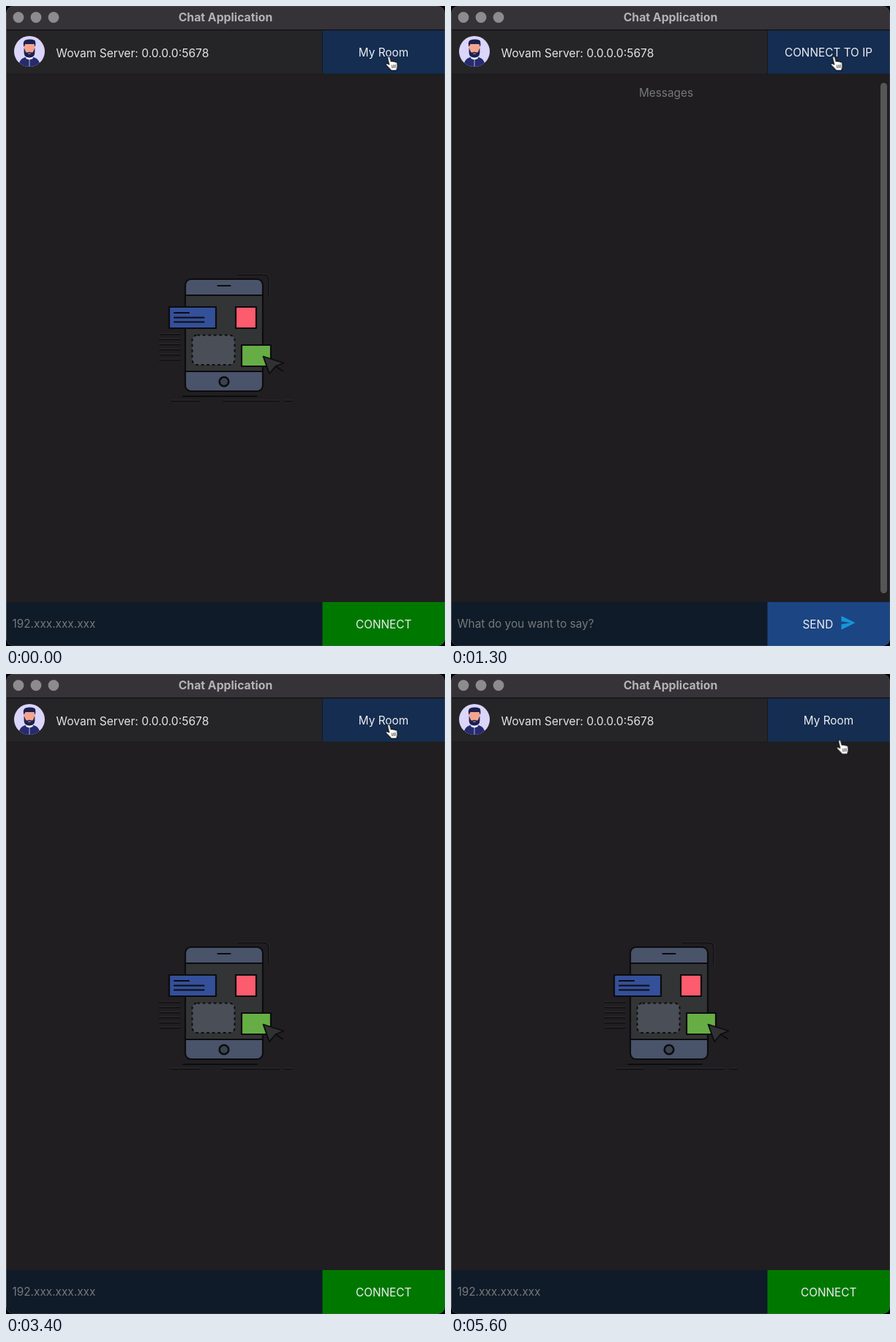
Recreate the animation shown at these times as an HTML page. Size 600 px wide and 874 px high, loop 5.7 s.

```html
<!DOCTYPE html>
<html lang="en">
<head>
<meta charset="utf-8">
<title>Chat Application</title>
<style>
  html, body { margin: 0; width: 100%; height: 100%; overflow: hidden; background: #000; }
  svg { display: block; width: 600px; height: 874px; }
  text { font: 15.35px Inter, "Open Sans", sans-serif; fill: #ededf0; }
  .title { font-weight: 700; font-size: 15.8px; fill: #b4b2b5; }
  .host { font-size: 15.6px; fill: #e4e4e6; }
  .mid { text-anchor: middle; }
  .hint { fill: #77787b; }
  .ink { fill: none; stroke: #0c0c0e; stroke-width: 2.2; stroke-linecap: round; stroke-linejoin: round; }
  .thin { stroke-width: 1.3; }

  .room, .chat, .hover, .address, .hand { animation: 5.7s step-end infinite; }
  .room { animation-name: room; }
  .chat { animation-name: chat; }
  .hover { animation-name: hover; }
  .address { animation-name: address; }
  .hand { animation-name: hand; }

  @keyframes room {
    0% { visibility: visible; }
    14.03% { visibility: hidden; }
    50.87%, 100% { visibility: visible; }
  }
  @keyframes chat {
    0% { visibility: hidden; }
    14.03% { visibility: visible; }
    50.87%, 100% { visibility: hidden; }
  }
  @keyframes hover {
    0% { fill: #142d51; }
    50.87% { fill: #2d2e30; }
    59.64%, 100% { fill: #142d51; }
  }
  @keyframes address {
    0% { visibility: visible; }
    14.03% { visibility: hidden; }
    59.64%, 100% { visibility: visible; }
  }
  @keyframes hand {
    0% { transform: translate(517.5px, 68px); }
    96.48% { transform: translate(521px, 77px); }
    98.23%, 100% { transform: translate(525.5px, 89.3px); }
  }
</style>
</head>
<body>
<svg viewBox="0 0 600 874">
  <defs>
    <clipPath id="win"><rect width="600" height="874" rx="10"/></clipPath>
    <clipPath id="disc"><circle cx="32" cy="62" r="21"/></clipPath>
    <clipPath id="phone"><rect x="245" y="373" width="106" height="153" rx="8"/></clipPath>
  </defs>

  <g clip-path="url(#win)">
    <rect width="600" height="874" fill="#201e21"/>
    <rect width="600" height="32" fill="#353337"/>
    <rect y="32" width="600" height="1.5" fill="#121113"/>
    <rect y="33.5" width="600" height="59.5" fill="#252427"/>
    <rect y="92.5" width="600" height="1" fill="#1a191b"/>

    <g fill="#8d8b8e">
      <circle cx="17" cy="15.5" r="7.4"/>
      <circle cx="41" cy="15.5" r="7.4"/>
      <circle cx="65" cy="15.5" r="7.4"/>
    </g>
    <text class="title mid" x="300" y="20.5">Chat Application</text>

    <g clip-path="url(#disc)">
      <rect x="11" y="41" width="42" height="42" fill="#dbd5fa"/>
      <path d="M17 84 Q17 72.5 26 70 L32 72 L38 70 Q47 72.5 47 84Z" fill="#262b6d"/>
      <path d="M27 68.5 L32 71 L37 68.5 L36.5 72 L32 73.5 L27.5 72Z" fill="#eeeefa"/>
      <path d="M32 73 V84" stroke="#9a9dcc" stroke-width="1.2"/>
      <path d="M25 51 H39 V61 Q39 69 32 69 Q25 69 25 61Z" fill="#f5a48d"/>
      <path d="M24.3 56 Q22.5 48 26.5 46.5 Q33 44.5 39.5 47 Q41.3 51 39.7 56 L38.5 52 H26.5Z" fill="#1b2150"/>
      <path d="M24.6 57 L26.3 61 Q27 64 29 63.5 Q32 62 35 63.5 Q37 64 37.7 61 L39.4 57 V64 Q39 70.5 32 70.5 Q25 70.5 24.6 64Z" fill="#1b2150"/>
      <path d="M30.3 65 H33.7" stroke="#f5a48d" stroke-width="1.2"/>
    </g>
    <text class="host" x="68.6" y="69.5">Wovam Server: 0.0.0.0:5678</text>

    <rect class="hover" x="433" y="33.5" width="167" height="59" fill="#142d51"/>
    <rect x="432" y="33.5" width="1" height="59" fill="#19181b"/>
    <rect y="814" width="433" height="60" fill="#0f1b28"/>

    <g class="room">
      <text class="mid" x="516" y="68.5">My Room</text>
      <rect x="432.5" y="814" width="168" height="60" fill="#007800"/>
      <text class="mid" x="516.2" y="850">CONNECT</text>

      <g clip-path="url(#phone)">
        <rect x="245" y="373" width="106" height="153" fill="#49536a"/>
        <rect x="245" y="395" width="106" height="104" fill="#333436"/>
      </g>
      <rect class="ink" x="245" y="373" width="106" height="153" rx="8"/>
      <path class="ink" d="M245 395 H351 M245 499 H351 M289.5 382 H306.5"/>
      <circle class="ink" cx="298" cy="513" r="6.3" style="fill:#3b4250;stroke-width:2.6"/>

      <rect class="ink" x="223" y="411" width="64" height="29" style="fill:#34509a"/>
      <path class="ink" d="M230 419 H250 M230 425.5 H270.5 M230 431.5 H270.5"/>
      <rect class="ink" x="314" y="411" width="28" height="29" style="fill:#fd5b6e"/>
      <rect class="ink" x="254.5" y="449.5" width="58" height="40.5" rx="7" stroke-dasharray="3.5 4" style="fill:#494e57;stroke-width:2;stroke-linecap:butt"/>
      <rect class="ink" x="322" y="463" width="40" height="29" style="fill:#67ad45"/>
      <path class="ink" d="M351.5 478.5 L379.5 487.5 L368.5 492 L360 502Z M370 493 L378 498.5" style="fill:#303133;stroke-width:1.8"/>

      <g class="ink thin">
        <path d="M316.5 367 H352 Q359 367 359 374 V396"/>
        <path d="M210 448.5 H238 M210 455.5 H238 M210 462.5 H238 M210 469.5 H238 M210 476.5 H238 M210 483.5 H238"/>
        <path d="M226 539.5 H264 M296 539.5 H373 M381 539.5 H391"/>
        <path d="M242 533 H343" stroke-width="2"/>
      </g>
      <g class="ink" style="stroke:#353438;stroke-width:.7">
        <path d="M316 365.9 H352 Q360.1 366 360.1 374 V396"/>
        <path d="M210 447.3 H238 M210 454.3 H238 M210 461.3 H238 M210 468.3 H238 M210 475.3 H238 M210 482.3 H238"/>
        <path d="M226 538.3 H264 M296 538.3 H373 M381 538.3 H391"/>
      </g>
    </g>
    <text class="hint address" x="8.5" y="849">192.xxx.xxx.xxx</text>

    <g class="chat" visibility="hidden">
      <rect y="93.5" width="600" height="720.5" fill="#1f1d20"/>
      <text class="mid" x="516" y="68.5">CONNECT TO IP</text>
      <text class="hint mid" x="294" y="124">Messages</text>
      <rect x="587" y="105" width="9" height="697" rx="4.5" fill="#575656"/>
      <text class="hint" x="8.5" y="849">What do you want to say?</text>
      <rect x="432.5" y="814" width="168" height="60" fill="#1c4583"/>
      <text x="480.5" y="850">SEND</text>
      <path d="M533.5 833 L552.5 842.3 L533.5 851.8 V844.4 L546 842.3 L533.5 840.2Z" fill="#1696d9"/>
    </g>

    <g class="hand">
      <path d="M4 3 Q3.7 1 5.3 .8 Q6.8 .6 7.3 2.3 L8.8 7.8 C9.8 6.8 11.3 7 11.8 8.1 C12.8 7.3 14.1 7.6 14.6 8.7 C15.8 8.1 16.9 8.7 17.1 10 L17.6 14 C17.8 16 17.2 17 16.6 18.5 V20 H8.8 C7.8 18 4.9 16 2.4 13.2 C.9 11.5 2.4 10 4.2 10.8 L6.2 12Z" fill="#fff" stroke="#0b0b0d" stroke-width="1.1" stroke-linejoin="round"/>
      <path d="M9.8 12.5 L10.6 17 M12.3 12.2 L12.9 16.8 M14.6 12 L15.1 16.5" stroke="#222" stroke-width=".9"/>
    </g>

    <path d="M.5 8 V866" stroke="#4a494c" stroke-width="1"/>
    <rect x=".5" y=".5" width="599" height="873" rx="9.5" fill="none" stroke="#6a696c" stroke-opacity=".35"/>
  </g>
</svg>
</body>
</html>
```
